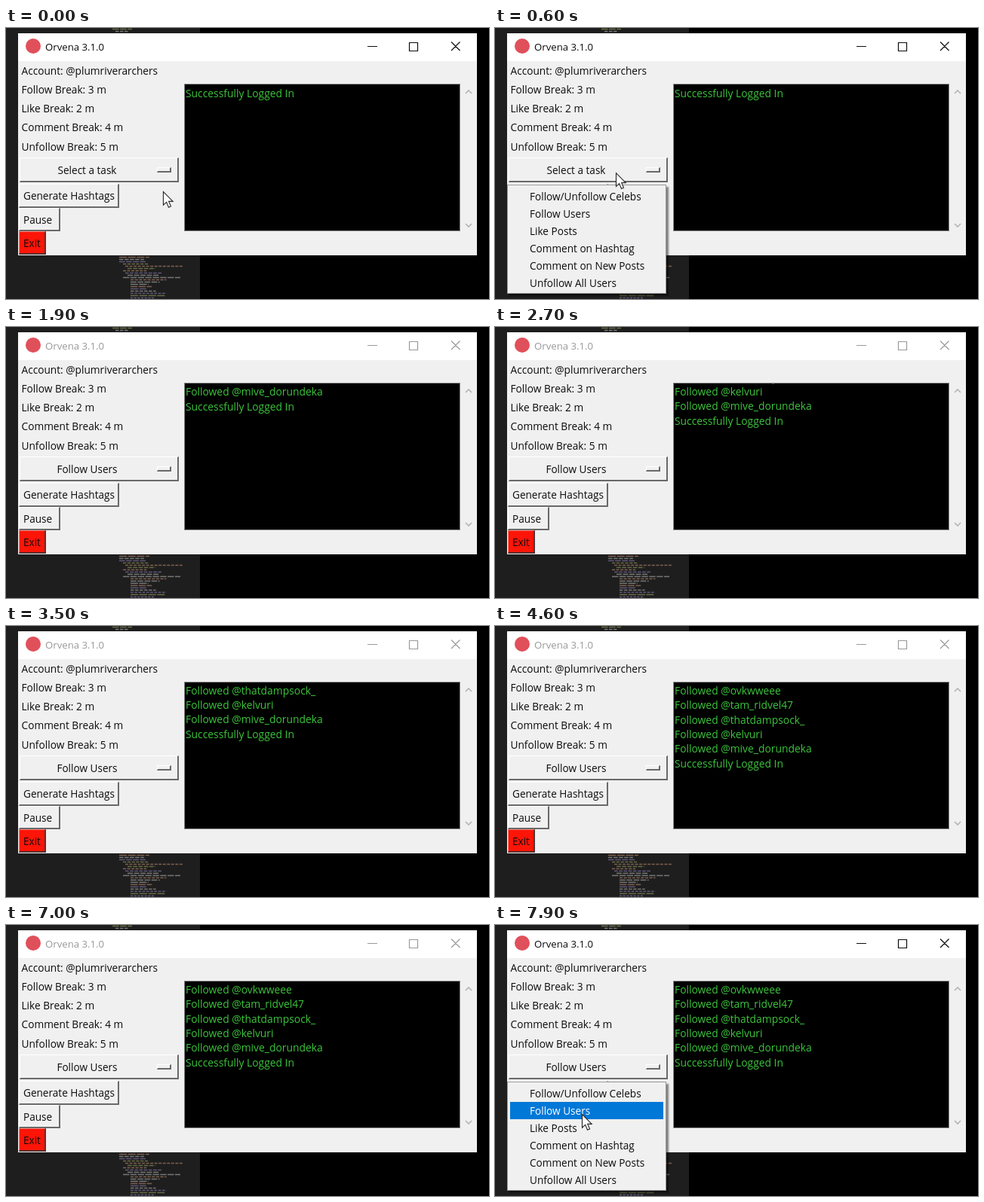
Recreate the animation shown at these times as an HTML page. Size 640 by 360 pixels, loop 8000 ms.

```html
<!DOCTYPE html>
<html lang="en">
<head>
<meta charset="utf-8">
<title>Task window</title>
<style>
  :root {
    --face: #f0f0f0; --ink: #0c0c0c; --dim: #999; --hot: #0078d7;
    --bevel: #fff #696969 #696969 #fff; --loop: 8s infinite;
  }
  html, body { margin: 0; width: 100%; height: 100%; overflow: hidden; background: #000; }
  #stage {
    position: relative; width: 640px; height: 360px; overflow: hidden; background: #000;
    font: 13.6px/20px "Open Sans", "Noto Sans", sans-serif; color: var(--ink); white-space: nowrap;
  }
  #stage div, #stage svg { position: absolute; box-sizing: border-box; }
  #desk { left: 0; top: 0; width: 257px; height: 360px; background: #1e1e1e; }
  #code { left: 0; top: 0; }

  #win { left: 16px; top: 7px; width: 608px; height: 295px; background: var(--face); }
  #bar { left: 0; top: 0; width: 608px; height: 37px; background: #fff; animation: focus var(--loop) step-end; }
  #icon { left: 10px; top: 7px; width: 20px; height: 20px; border-radius: 50%; background: #e0505a; }
  #title { left: 36px; top: 7.5px; font-size: 13.2px; }
  #ctl { left: 0; top: 0; fill: none; stroke: currentColor; stroke-width: 1.2; }
  @keyframes focus {
    0%, 93.75%, 100% { color: var(--ink); }
    20% { color: var(--dim); }
  }

  #info { left: 20.5px; top: 43.6px; font-size: 13.7px; line-height: 25.3px; }
  .btn { border: solid; border-width: 1px 2px 2px 1px; border-color: var(--bevel); background: var(--face); }
  .btn span { position: absolute; left: 5px; top: 5px; }
  #pick { left: 18px; top: 172px; width: 211px; height: 33px; }
  #pick span { left: 0; width: 177px; top: 6px; text-align: center; }
  #pick i {
    position: absolute; left: 181px; top: 12px; width: 19px; height: 7px; box-sizing: border-box;
    border: solid; border-width: 1px 2px 2px 1px; border-color: var(--bevel);
  }
  #before { animation: before var(--loop) step-end; }
  #after { animation: after var(--loop) step-end; }
  @keyframes before { 0% { visibility: visible; } 13.125%, 100% { visibility: hidden; } }
  @keyframes after { 0% { visibility: hidden; } 13.125%, 100% { visibility: visible; } }
  #tags { left: 17px; top: 207px; width: 133px; height: 32px; }
  #pause { left: 17px; top: 239px; width: 55px; height: 31px; }
  #exit { left: 17px; top: 270px; width: 36px; height: 31px; background: #fd1508; border-color: #ff8078 #5a3030 #5a3030 #ff8078; }

  #console {
    left: 236px; top: 74px; width: 366px; height: 196px; background: #000; overflow: hidden;
    border: 1px solid #8a8a8a; color: #3cc53c; font-size: 13.85px; line-height: 19.3px;
  }
  #log { left: 1px; top: 1.2px; animation: log var(--loop) step-end; }
  @keyframes log {
    0% { transform: translateY(-96.5px); }
    23.125% { transform: translateY(-77.2px); }
    31.25% { transform: translateY(-57.9px); }
    39.375% { transform: translateY(-38.6px); }
    47.5% { transform: translateY(-19.3px); }
    55.625%, 100% { transform: none; }
  }
  #scroll { left: 604px; top: 74px; fill: none; stroke: #b4b4b4; stroke-width: 1.6; }

  #menu {
    left: 16px; top: 208px; width: 211px; height: 145px; padding: 3px;
    background: var(--face); border: 1px solid #979797; box-shadow: 3px 3px 2px #0007;
    line-height: 23px; animation: menu var(--loop) step-end;
  }
  #menu p { margin: 0; padding-left: 26px; height: 23px; }
  @keyframes menu {
    0%, 13.125% { visibility: hidden; }
    6.25%, 93.75%, 100% { visibility: visible; }
  }
  #first { animation: first var(--loop) step-end; }
  #second { animation: second var(--loop) step-end; }
  @keyframes first {
    0%, 10.6%, 97.3%, 100% { background: none; color: var(--ink); }
    9%, 96% { background: var(--hot); color: #fff; }
  }
  @keyframes second {
    0%, 13.125% { background: none; color: var(--ink); }
    10.6%, 97.3%, 100% { background: var(--hot); color: #fff; }
  }

  #mouse { left: 0; top: 0; overflow: visible; animation: mouse var(--loop) linear; }
  @keyframes mouse {
    0% { transform: translate(208px, 217px); }
    5%, 7.5% { transform: translate(160px, 192px); }
    11.875%, 16.25% { transform: translate(145px, 250px); }
    20%, 88.75% { transform: translate(190px, 370px); }
    92.5%, 95% { transform: translate(130px, 192px); }
    98.125%, 100% { transform: translate(115px, 251px); }
  }
</style>
</head>
<body>
<div id="stage">
  <div id="desk"></div>
  <svg id="code" width="257" height="360"></svg>

  <div id="win">
    <div id="bar">
      <div id="icon"></div>
      <div id="title">Orvena 3.1.0</div>
      <svg id="ctl" width="608" height="37">
        <path d="M463 17.5h13M518.5 12.5h11v11h-11zM574 11.5l11.5 11.5M585.5 11.5L574 23"/>
      </svg>
    </div>
  </div>

  <div id="info">Account: @plumriverarchers<br>Follow Break: 3 m<br>Like Break: 2 m<br>Comment Break: 4 m<br>Unfollow Break: 5 m</div>

  <div id="pick" class="btn"><span id="before">Select a task</span><span id="after">Follow Users</span><i></i></div>
  <div id="tags" class="btn"><span>Generate Hashtags</span></div>
  <div id="pause" class="btn"><span>Pause</span></div>
  <div id="exit" class="btn"><span>Exit</span></div>

  <div id="console">
    <div id="log">Followed @ovkwweee<br>Followed @tam_ridvel47<br>Followed @thatdampsock_<br>Followed @kelvuri<br>Followed @mive_dorundeka<br>Successfully Logged In</div>
  </div>
  <svg id="scroll" width="18" height="196"><path d="M5 13l4-4 4 4M5 186l4 4 4-4"/></svg>

  <div id="menu">
    <p id="first">Follow/Unfollow Celebs</p>
    <p id="second">Follow Users</p>
    <p>Like Posts</p>
    <p>Comment on Hashtag</p>
    <p>Comment on New Posts</p>
    <p>Unfollow All Users</p>
  </div>

  <svg id="mouse" width="15" height="23">
    <path d="M.5 .5V18.2L4.7 14.4L7.5 21.2L10.5 20L7.7 13.4H13.2Z" fill="#fff" stroke="#222" stroke-width="1.1"/>
  </svg>
</div>
<script>
  // Faint rows of source code on the desktop behind the window.
  const tones = ['#8c8c8c', '#96705c', '#71658f', '#77804f'];
  const rand = n => Math.abs(Math.sin(n * 12.9898) * 43758.5453) % 1;
  const row = (x, y, width, n) =>
    `<path d="M${x} ${y}h${width}" stroke="${tones[Math.floor(rand(n) * 4)]}" stroke-dasharray="${3 + rand(n + 5) * 9} 1.5"/>`;
  let rows = '';
  for (let i = 0; i < 2; i++) rows += row(141 + i * 4, 1.5 + i * 3, 26 - i * 8, i + 1);
  for (let i = 0; i < 19; i++) {
    const indent = i < 3 ? 150 : i < 10 ? 155 + (i % 3) * 3 : 165;
    const width = i === 4 || i === 9 ? 76 : 14 + rand(i + 20) * 34;
    rows += row(indent, 304.5 + i * 3, width, i + 40);
  }
  document.getElementById('code').innerHTML = `<g stroke-width="1.5" opacity=".8">${rows}</g>`;
</script>
</body>
</html>
```
